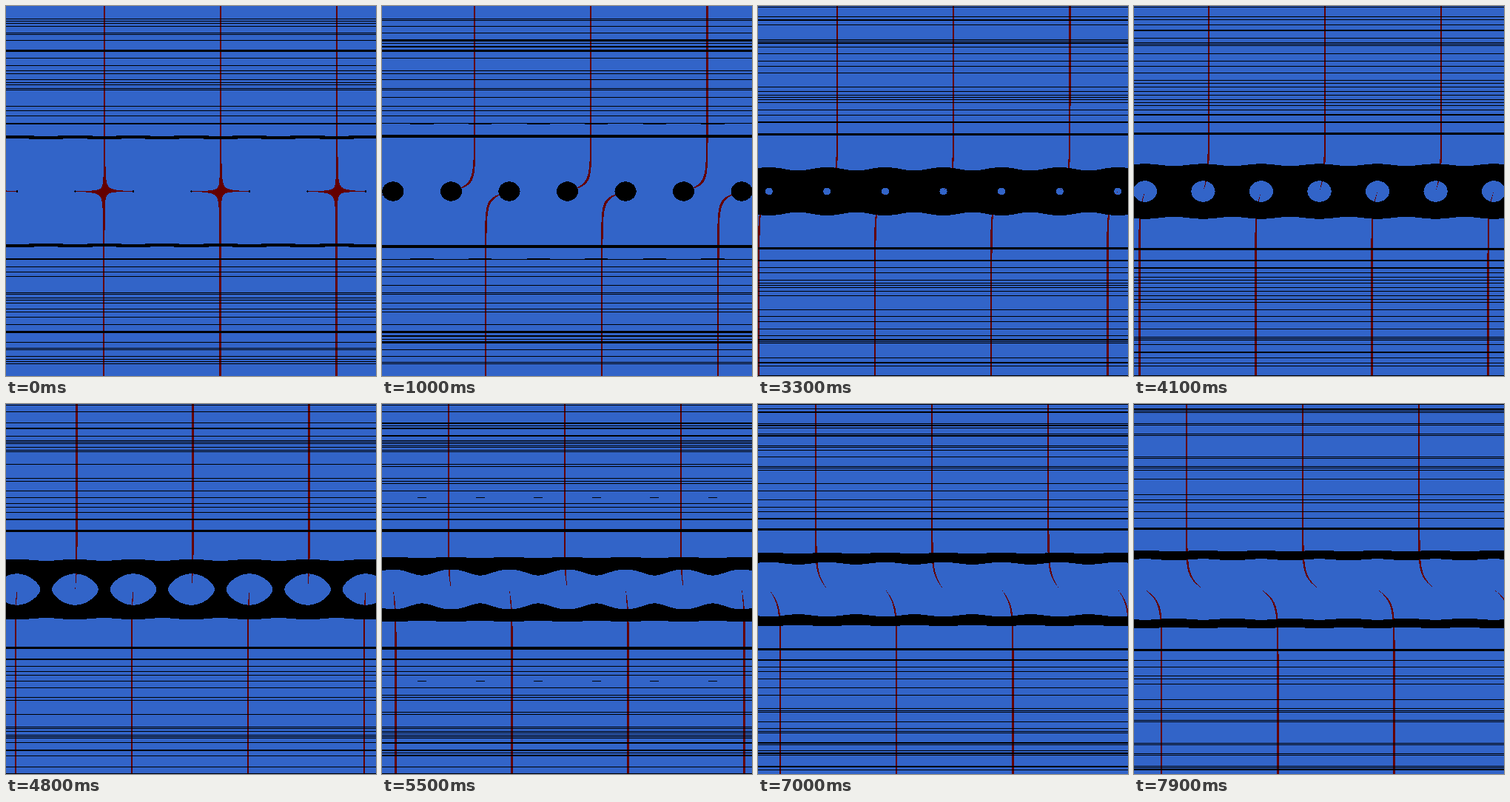
These frames come from a looping animation (500x500 px, 8 s). An HTML page with a canvas:

```html
<!DOCTYPE html>
<html lang="en">
<head>
<meta charset="utf-8">
<title>Level bands of sin 2z</title>
<style>
  html, body { margin: 0; width: 100%; height: 100%; overflow: hidden; background: #3264c8; }
  canvas { display: block; }
</style>
</head>
<body>
<canvas id="plot" width="500" height="500"></canvas>
<script>
const SIZE = 500, SCALE = 50;
const STEP_MS = 100, STEPS = 80, CYCLE = 200;
const PERIOD = 10, MOD_BAND = 0.15, ARG_BAND = 0.015;
const TAU = 2 * Math.PI;

// Pixels as 0xAABBGGRR
const BLUE = 0xffc86432, RED = 0xff000064, BLACK = 0xff000000;

const ctx = document.getElementById('plot').getContext('2d');
const image = ctx.createImageData(SIZE, SIZE);
const pixels = new Uint32Array(image.data.buffer);

// Modulus and argument of sin 2z for each pixel, in turns of their periods
const mods = new Float64Array(SIZE * SIZE);
const args = new Float64Array(SIZE * SIZE);
for (let row = 0, i = 0; row < SIZE; row++) {
  const y = 2 * (SIZE / 2 - row) / SCALE;
  const ch = Math.cosh(y), sh = Math.sinh(y);
  for (let col = 0; col < SIZE; col++, i++) {
    const x = 2 * (col - SIZE / 2) / SCALE;
    const re = Math.sin(x) * ch, im = Math.cos(x) * sh;
    mods[i] = Math.sqrt(re * re + im * im) / PERIOD;
    args[i] = Math.atan2(im, re) / TAU;
  }
}

const fract = v => v - Math.floor(v);

function draw(step) {
  const phase = (step + 1) / CYCLE;
  for (let i = 0; i < pixels.length; i++) {
    pixels[i] = fract(phase - mods[i]) < MOD_BAND ? BLACK
      : fract(phase - args[i]) < ARG_BAND ? RED
      : BLUE;
  }
  ctx.putImageData(image, 0, 0);
}

let shown = -1;
function tick() {
  const step = Math.floor(performance.now() / STEP_MS) % STEPS;
  if (step !== shown) draw(shown = step);
  requestAnimationFrame(tick);
}
tick();
</script>
</body>
</html>
```
